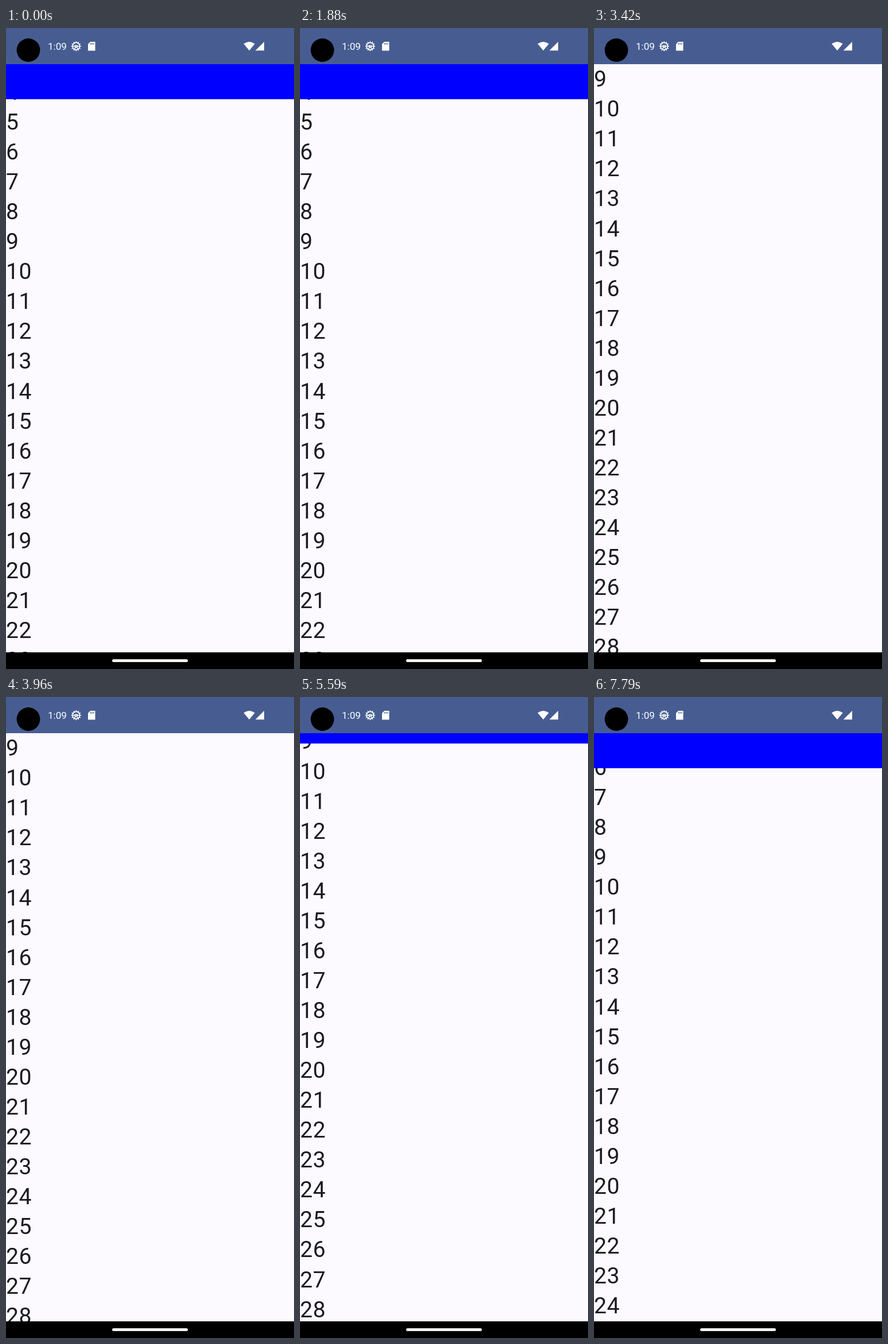
An HTML page with a canvas that plays this animation: 502x1116 px, repeating every 7830 ms.

```html
<!DOCTYPE html>
<html lang="en">
<head>
<meta charset="utf-8">
<title>Collapsing toolbar list</title>
<style>
  html, body { margin: 0; width: 100%; height: 100%; overflow: hidden; background: #000; }
  canvas { display: block; }
</style>
</head>
<body>
<canvas id="stage" width="502" height="1116"></canvas>
<script>
const ctx = document.getElementById('stage').getContext('2d');
const LOOP = 7830;
const WIDTH = 502;
const STATUS_BOTTOM = 63;
const LIST_BOTTOM = 1087;
const BAR_HEIGHT = 61;
const PITCH = 52.06;
const ANCHOR_ROW = 5;

// [time in ms, vertical centre of the anchor row]
const keys = [
  [0, 163], [2600, 163], [2790, 135], [3290, -108], [3420, -120],
  [4040, -120], [4420, 50], [4590, 65], [4840, 65], [5250, -150],
  [5420, -150], [6100, -10], [6500, 24], [6790, 58], [7050, 70], [LOOP, 70]
];

const clamp = (v, lo, hi) => Math.min(hi, Math.max(lo, v));
const slope = i => (keys[i + 1][1] - keys[i][1]) / (keys[i + 1][0] - keys[i][0]);

// Harmonic mean keeps every segment monotone, so finger pauses stay flat.
function tangent(i) {
  if (i === 0 || i === keys.length - 1) return 0;
  const a = slope(i - 1), b = slope(i);
  return a * b > 0 ? 2 * a * b / (a + b) : 0;
}

function segmentY(i, t) {
  const [t0, y0] = keys[i], [t1, y1] = keys[i + 1];
  const d = t1 - t0, u = (t - t0) / d, v = 1 - u;
  return y0 * (1 + 2 * u) * v * v + y1 * u * u * (3 - 2 * u)
    + d * u * v * (tangent(i) * v - tangent(i + 1) * u);
}

// The bar absorbs scroll in both directions before it is fully open or shut.
function poseAt(t) {
  let bar = BAR_HEIGHT, y = keys[0][1], i = 0;
  const moveTo = next => {
    bar = clamp(bar + next - y, 0, BAR_HEIGHT);
    y = next;
  };
  while (i < keys.length - 2 && t >= keys[i + 1][0]) moveTo(keys[++i][1]);
  moveTo(segmentY(i, t));
  return { bar, y };
}

function rect(color, x, y, w, h) {
  ctx.fillStyle = color;
  ctx.fillRect(x, y, w, h);
}

function disc(color, x, y, r) {
  ctx.fillStyle = color;
  ctx.beginPath();
  ctx.arc(x, y, r, 0, Math.PI * 2);
  ctx.fill();
}

function polygon(color, ...points) {
  ctx.fillStyle = color;
  ctx.beginPath();
  points.forEach(([x, y]) => ctx.lineTo(x, y));
  ctx.fill();
}

function text(str, x, y, size, color, spacing = 0) {
  ctx.font = `${size}px Roboto, sans-serif`;
  ctx.letterSpacing = `${spacing}px`;
  ctx.fillStyle = color;
  ctx.fillText(str, x, y);
}

function spoke(angle, from, to) {
  ctx.beginPath();
  ctx.moveTo(from * Math.cos(angle), from * Math.sin(angle));
  ctx.lineTo(to * Math.cos(angle), to * Math.sin(angle));
  ctx.stroke();
}

function gear(x, y) {
  ctx.save();
  ctx.translate(x, y);
  ctx.strokeStyle = '#fff';
  ctx.lineWidth = 1.6;
  ctx.beginPath();
  ctx.arc(0, 0, 6.2, 0, Math.PI * 2);
  ctx.stroke();
  for (let i = 0; i < 12; i++) spoke(i * Math.PI / 6, 6, 8.6);
  ctx.lineWidth = 1.4;
  for (const a of [0, 1 / 3, 2 / 3, 1]) spoke(a * Math.PI, 1, 6);
  ctx.strokeRect(-2, -1.2, 4, 2.4);
  ctx.restore();
}

function statusBar() {
  const ink = '#fff', base = '#475d92';
  rect(base, 0, 0, WIDTH, STATUS_BOTTOM);
  disc('#000', 39, 38.5, 20.4);
  text('1:09', 73, 38, 17.1, ink);
  gear(122.3, 31.7);
  polygon(ink, [147, 24], [155.5, 24], [155.5, 39.5], [143, 39.5], [143, 28]);
  for (let i = 0; i < 3; i++) rect(base, 147 + i * 2.6, 26, 1.2, 3);
  ctx.fillStyle = ink;
  ctx.beginPath();
  ctx.moveTo(424, 39.3);
  ctx.lineTo(414.3, 27.5);
  ctx.quadraticCurveTo(424, 20.3, 433.7, 27.5);
  ctx.fill();
  polygon(ink, [450, 24], [450, 39.3], [434.7, 39.3]);
}

function list(top, anchorY) {
  rect('#fcfaff', 0, top, WIDTH, LIST_BOTTOM - top);
  ctx.save();
  ctx.beginPath();
  ctx.rect(0, top, WIDTH, LIST_BOTTOM - top);
  ctx.clip();
  const first = Math.max(0, ANCHOR_ROW + Math.floor((top - 30 - anchorY) / PITCH));
  for (let row = first; ; row++) {
    const y = anchorY + (row - ANCHOR_ROW) * PITCH;
    if (y > LIST_BOTTOM + 30) break;
    text(String(row), 0, y + 14, 39.05, '#1b1b1f', 0.6);
  }
  ctx.restore();
}

function navigationBar() {
  rect('#000', 0, LIST_BOTTOM, WIDTH, 29);
  ctx.fillStyle = '#f4f4f4';
  ctx.beginPath();
  ctx.roundRect(185, 1099, 132, 5, 2.5);
  ctx.fill();
}

function draw(t) {
  const { bar, y } = poseAt(t);
  const top = Math.round(STATUS_BOTTOM + bar);
  list(top, y);
  rect('#00f', 0, STATUS_BOTTOM, WIDTH, top - STATUS_BOTTOM);
  statusBar();
  navigationBar();
}

const start = performance.now();
function tick() {
  draw((performance.now() - start) % LOOP);
  requestAnimationFrame(tick);
}
tick();
</script>
</body>
</html>
```
